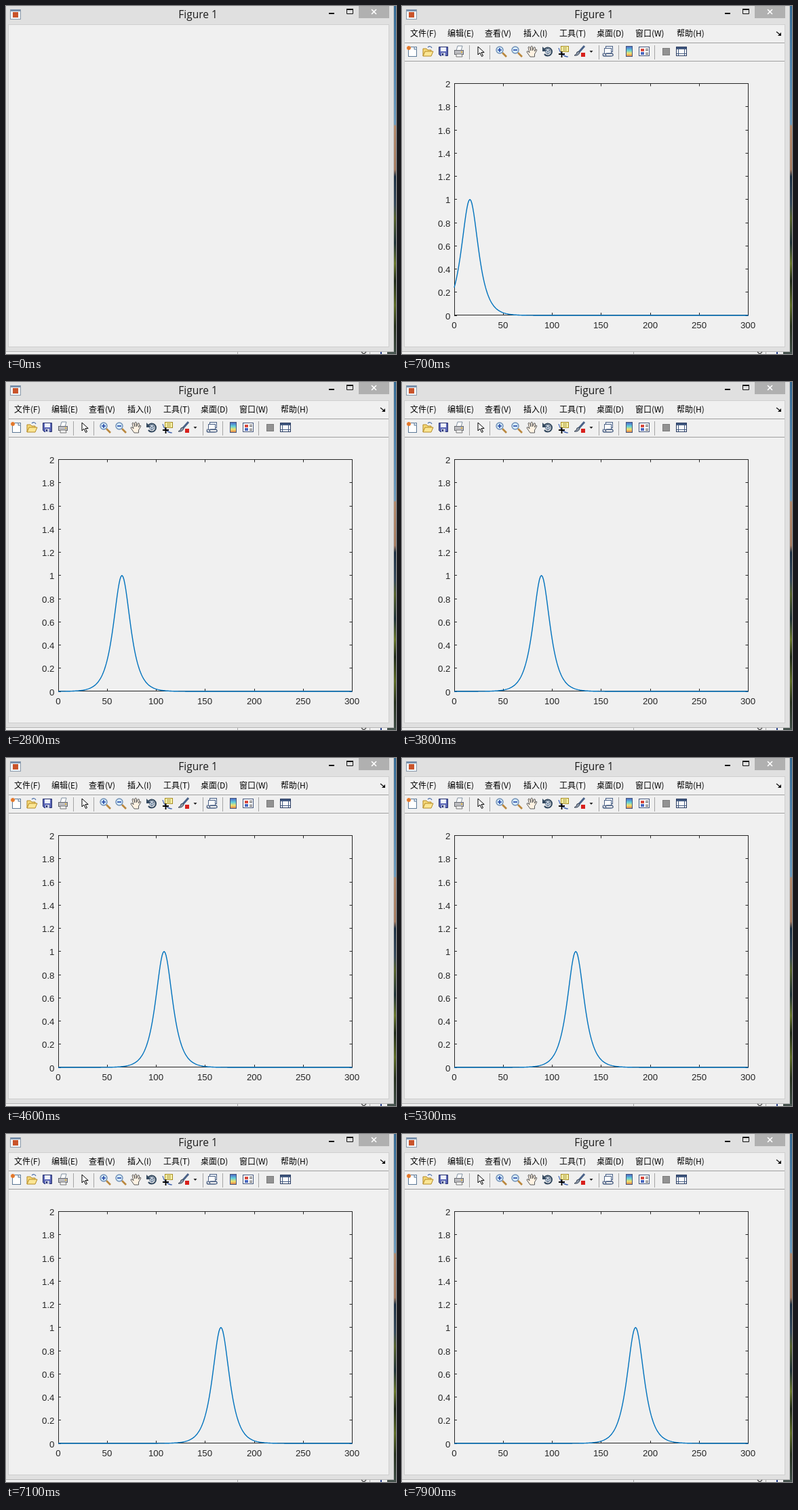
Write an HTML page that moves like this. It is 575x514 px and loops after 8 s.

```html
<!DOCTYPE html>
<html lang="zh">
<head>
<meta charset="utf-8">
<title>Figure 1</title>
<style>
html, body { margin: 0; width: 100%; height: 100%; overflow: hidden; background: #e0e0e0; }
svg { display: block; }
.title { font: 15.5px "Open Sans", "Noto Sans", sans-serif; fill: #1c1c1c; }
.menu { font: 12px "Noto Sans CJK SC", "Noto Sans CJK", sans-serif; fill: #000; }
.tick { font: 13.3px "Liberation Sans", Arial, sans-serif; fill: #262626; }
</style>
</head>
<body>
<svg id="stage" width="575" height="514" viewBox="0 0 575 514">
  <defs>
    <linearGradient id="view" x1="0" y1="0" x2="0" y2="1">
      <stop offset="0" stop-color="#356a94"/>
      <stop offset=".2" stop-color="#5489b3"/>
      <stop offset=".34" stop-color="#6d9dc0"/>
      <stop offset=".345" stop-color="#b48a6c"/>
      <stop offset=".47" stop-color="#a77d62"/>
      <stop offset=".49" stop-color="#1b2f42"/>
      <stop offset=".57" stop-color="#34485a"/>
      <stop offset=".61" stop-color="#56632a"/>
      <stop offset=".68" stop-color="#1c3036"/>
      <stop offset=".74" stop-color="#69792a"/>
      <stop offset=".79" stop-color="#1d2818"/>
      <stop offset=".86" stop-color="#5d6d24"/>
      <stop offset=".92" stop-color="#25301c"/>
      <stop offset="1" stop-color="#3c4b45"/>
    </linearGradient>
    <linearGradient id="bar" x1="0" y1="0" x2="0" y2="1">
      <stop offset="0" stop-color="#4a62c8"/>
      <stop offset=".4" stop-color="#62d0d8"/>
      <stop offset=".7" stop-color="#f2e26a"/>
      <stop offset="1" stop-color="#e07a4a"/>
    </linearGradient>
  </defs>
  <g id="window"></g>
  <g id="figure">
    <g id="menus"></g>
    <g id="tools"></g>
    <g id="axes"></g>
    <path id="pulse" fill="none" stroke="#0072bd" stroke-width="1.4" stroke-linejoin="round"/>
  </g>
</svg>
<script>
const LOOP = 8000, STEP = 100;
const LEFT = 77, RIGHT = 510.5, TOP = 114.5, BOTTOM = 457;
const PULSE_WIDTH = 7.6;
const $ = id => document.getElementById(id);
const px = x => LEFT + x * (RIGHT - LEFT) / 300;
const py = y => BOTTOM - y * (BOTTOM - TOP) / 2;

const rect = (x, y, w, h, fill, stroke = 'none') =>
  `<rect x="${x}" y="${y}" width="${w}" height="${h}" fill="${fill}" stroke="${stroke}"/>`;
const path = (d, stroke, fill = 'none', width = 1) =>
  `<path d="${d}" stroke="${stroke}" fill="${fill}" stroke-width="${width}"/>`;
const circle = (x, y, r, fill, stroke = 'none', width = 1) =>
  `<circle cx="${x}" cy="${y}" r="${r}" fill="${fill}" stroke="${stroke}" stroke-width="${width}"/>`;
const text = (x, y, cls, anchor, s) =>
  `<text x="${x}" y="${y}" class="${cls}" text-anchor="${anchor}">${s}</text>`;

function drawWindow() {
  return rect(0, 0, 575, 514, '#e0e0e0')
    + rect(572, 0, 3, 514, 'url(#view)')
    + path('M571.5 0V511', '#c4c4c4')
    + rect(0, 511, 562, 3, '#f2f2f2')
    + path('M0 510.5H572', '#b5b5b5')
    + path('M341.5 511v3M536.5 511v3', '#aaa')
    + path('M524 511l3.5 3 3.5-3', '#555', 'none', 1.5)
    + rect(552, 511, 2, 3, '#27408b') + rect(562, 511, 13, 3, '#47544f')
    + rect(3.5, 27.5, 561, 476, '#f0f0f0', '#cfcfcf')
    + rect(6.5, 5.5, 15, 14, '#f4f7fa', '#8a9aab') + rect(7, 5, 14, 3, '#7890ab')
    + rect(10, 9, 8, 8, '#c9542b')
    + text(283, 18, 'title', 'middle', 'Figure 1')
    + rect(476, 10, 8, 2, '#111')
    + path('M502.5 5V11.5H511.5V5', '#111') + rect(502, 4, 10, 2, '#111')
    + rect(520, 0, 45, 18, '#b0b0b0')
    + path('M539 5l7 7M546 5l-7 7', '#fff', 'none', 1.6);
}

function drawMenus() {
  const names = ['文件(F)', '编辑(E)', '查看(V)', '插入(I)', '工具(T)', '桌面(D)', '窗口(W)', '帮助(H)'];
  const starts = [12, 67, 122, 179, 232, 287, 344, 405];
  return names.map((s, i) => text(starts[i], 45, 'menu', 'start', s)).join('')
    + path('M552 38l5 4', '#111', 'none', 1.2) + path('M559 39v5h-5z', 'none', '#111')
    + path('M4 54.5H564M4 81.5H564', '#a0a0a0');
}

const magnifier = plus =>
  path('M2 2l6 6', '#b9873d', 'none', 2.6)
  + circle(-2, -2, 5, '#d5ebfa', '#6f8fb5', 1.4)
  + path(plus ? 'M-5 -2h6M-2 -5v6' : 'M-5 -2h6', '#2447a5', 'none', 1.6);

const icons = [
  [15, rect(-5.5, -6.5, 12, 14, '#fff', '#5c7896') + path('M3 -7v4h4', '#5c7896', '#d7e4f0')
    + circle(-5, -5, 3, '#f08a3c') + path('M-8 -5h6M-5 -8v6', '#d66a22')],
  [38, path('M-7 7V-4h5l2 2h5v3', '#b58a25', '#f5d878') + path('M-7 7l3-7h12l-3 7z', '#b58a25', '#fbe694')
    + path('M0 -6q4 -3 6 1', '#4a6da8', 'none', 1.2)],
  [61, path('M-6.5 -6.5h13v13h-11l-2-2z', '#26306e', '#5a65b5') + rect(-4, -6, 8, 6, '#eef2fb')
    + rect(-3, 2, 6, 5, '#c7cde0') + rect(-2, 3, 2, 3, '#26306e')],
  [84, path('M-4 -1l2-7h7l-2 7z', '#8090a0', '#fff') + rect(-6.5, -1.5, 13, 6, '#bcbcc0', '#66686e')
    + path('M-4 4h8l1 4h-9z', '#777', '#f4f4f4') + rect(3, 0, 2, 2, '#dfb33c')],
  [116, path('M-4 -7v12l3-3 2.5 5.5 2-1-2.5-5h4.2z', '#000', '#fff')],
  [146, magnifier(true)],
  [169, magnifier(false)],
  [192, path('M-3 8l-5-7q0-2 2-1l2 2-2-8q1-2 2.5 0l1.5 5V-7q1-2 2.5 0v6l2-5q2-1 2 1l-1 5 2-3q2 0 1 2l-3 5v4z', '#5a5a5a', '#fff2e2')],
  [215, path('M-5 -3A6 6 0 1 1 -5 4', '#34495f', 'none', 2.2) + path('M-8 -7v7h7z', 'none', '#34495f')
    + path('M-3 -2l3-2 3 2v4l-3 2-3-2zM-3 -2l3 2 3-2M0 0v4', '#4a6280', '#dfe9f2')],
  [238, rect(-3.5, -7.5, 11, 8, '#fcf5a8', '#a58b24') + path('M-1 -5h6M-1 -2h6', '#8a7b30')
    + path('M-7 -5q1 5 5 9t9 4', '#3559a8', 'none', 1.2) + path('M-7 4h9M-2.5 0v9', '#000', 'none', 1.8)],
  [262, path('M7 -8L-1 1', '#4a6288', 'none', 3) + path('M-1 0q-4 0 -4 4l-3 2q6 1 8-4z', '#404a58', '#8c98aa')
    + rect(2, 2, 6, 6, '#d8201c')],
  [279, path('M-2.5 -1h5l-2.5 3z', 'none', '#222')],
  [304, rect(-3.5, -7.5, 10, 8, '#e8eef7', '#4c6185') + rect(-5.5, -4.5, 10, 8, '#fff', '#4c6185')
    + path('M-7 2.5q-2 5 2 4.5h9q5 0 2-4h-7q-5 0-2 3', '#4c6185', 'none', 1.5)],
  [335, rect(-4.5, -7.5, 9, 15, 'url(#bar)', '#44557a')],
  [357, rect(-7.5, -6.5, 15, 13, '#fff', '#44557a') + rect(-5, -4, 5, 4, '#d8473c') + rect(-5, 1, 5, 4, '#4b69c0')
    + path('M2 -3.5h4M2 -1.5h4M2 2.5h4M2 4.5h4', '#555')],
  [389, rect(-4.5, -4.5, 10, 10, '#929292', '#7c7c7c')],
  [412, rect(-7.5, -6.5, 15, 13, '#fff', '#273a60') + rect(-7, -6, 14, 3, '#41587f')
    + path('M-4.5 -3v9M4.5 -3v9M-7 3.5h14', '#41587f')]
];

function drawTools() {
  const bars = [100, 130, 291, 320, 373].map(x => path(`M${x - .5} 58v21`, '#a5a5a5')).join('');
  return bars + icons.map(([x, art]) => `<g transform="translate(${x} 67)">${art}</g>`).join('');
}

function drawAxes() {
  let marks = '', labels = '';
  for (let v = 0; v <= 300; v += 50) {
    const x = Math.floor(px(v)) + .5;
    marks += `M${x} ${BOTTOM}v-4M${x} ${TOP}v4`;
    labels += text(x - .5, 476, 'tick', 'middle', v);
  }
  for (let i = 0; i <= 10; i++) {
    const y = Math.floor(py(i / 5)) + .5;
    marks += `M${LEFT} ${y}h4M${RIGHT} ${y}h-4`;
    labels += text(71.5, y + 5, 'tick', 'end', i / 5);
  }
  return path(`M${LEFT + .5} ${TOP}H${RIGHT}V456.5H${LEFT + .5}z` + marks, '#262626') + labels;
}

function drawPulse(peak) {
  let d = '';
  for (let x = 0; x <= 300; x++) {
    const y = 1 / Math.cosh((x - peak) / PULSE_WIDTH);
    d += (x ? 'L' : 'M') + px(x).toFixed(2) + ' ' + py(y).toFixed(2);
  }
  $('pulse').setAttribute('d', d);
}

function render(time) {
  const step = Math.floor(time % LOOP / STEP);
  $('figure').style.display = step ? '' : 'none';
  drawPulse(Math.round(2.345 * step - .2));
}

$('window').innerHTML = drawWindow();
$('menus').innerHTML = drawMenus();
$('tools').innerHTML = drawTools();
$('axes').innerHTML = drawAxes();

const start = performance.now();
function tick() {
  render(performance.now() - start);
  requestAnimationFrame(tick);
}
tick();
</script>
</body>
</html>
```
